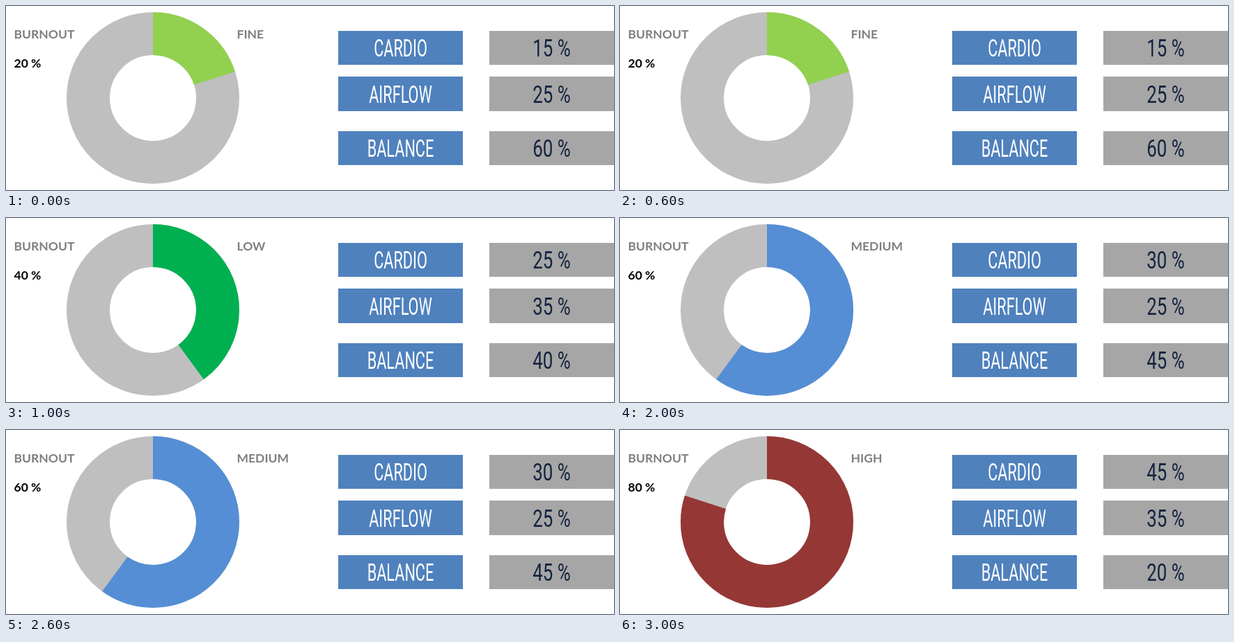
These frames come from a looping animation (873 px wide and 266 px high, 4000 ms). An HTML page:

```html
<!DOCTYPE html>
<html lang="en">
<head>
<meta charset="utf-8">
<title>Burnout level</title>
<style>
  html, body { margin: 0; width: 100%; height: 100%; overflow: hidden; background: #fff; }
  svg { display: block; width: 873px; height: 266px; }
  rect { shape-rendering: crispEdges; }
  .ring { fill: none; stroke-width: 62; }
  .side { font: 700 17.5px Lato, sans-serif; fill: #7f7f7f; }
  .level { fill: #000; }
  .cell { font: 400 35px Roboto, sans-serif; text-anchor: middle; fill: #fff; }
  .value { fill: #14243f; }
  .state { visibility: hidden; animation: show 4s step-end infinite; }
  @keyframes show {
    0% { visibility: visible; }
    25%, 100% { visibility: hidden; }
  }
</style>
</head>
<body>
<svg id="stage" viewBox="0 0 873 266"></svg>
<script>
  const rows = [
    { name: "CARDIO", y: 36, h: 49 },
    { name: "AIRFLOW", y: 102, h: 50 },
    { name: "BALANCE", y: 181, h: 49 }
  ];
  const states = [
    { label: "FINE", level: 20, color: "#92d050", values: [15, 25, 60] },
    { label: "LOW", level: 40, color: "#00b050", values: [25, 35, 40] },
    { label: "MEDIUM", level: 60, color: "#558ed5", values: [30, 25, 45] },
    { label: "HIGH", level: 80, color: "#953735", values: [45, 35, 20] }
  ];

  const ring = (color, share) =>
    `<circle class="ring" cx="211" cy="133" r="93" stroke="${color}" pathLength="100"
      ${share ? `stroke-dasharray="${share} 100"` : ""} transform="rotate(-90 211 133)"/>`;

  const side = (text, x, y, extra = "") =>
    `<text class="side ${extra}" x="${x}" y="${y}">${text}</text>`;

  // Condensed lettering, centred in its box
  const cell = (text, x, row, squeeze, extra = "") =>
    `<text class="cell ${extra}" transform="translate(${x} ${row.y + row.h / 2 + 12.7}) scale(${squeeze} 1)">${text}</text>`;

  const box = (x, row, color) =>
    `<rect x="${x}" y="${row.y}" width="179" height="${row.h}" fill="${color}"/>`;

  const base = ring("#bfbfbf") + side("BURNOUT", 11.5, 47) + rows.map(row =>
    box(477, row, "#4f81bd") + box(694, row, "#a6a6a6") + cell(row.name, 566.5, row, 0.62)
  ).join("");

  const layers = states.map((s, i) =>
    `<g class="state" style="animation-delay:${i - states.length}s">` +
    ring(s.color, s.level) +
    side(s.label, 331.5, 47) +
    side(s.level + " %", 11.5, 89, "level") +
    rows.map((row, k) => cell(s.values[k] + " %", 783.5, row, 0.74, "value")).join("") +
    "</g>"
  ).join("");

  document.getElementById("stage").innerHTML = base + layers;
</script>
</body>
</html>
```
